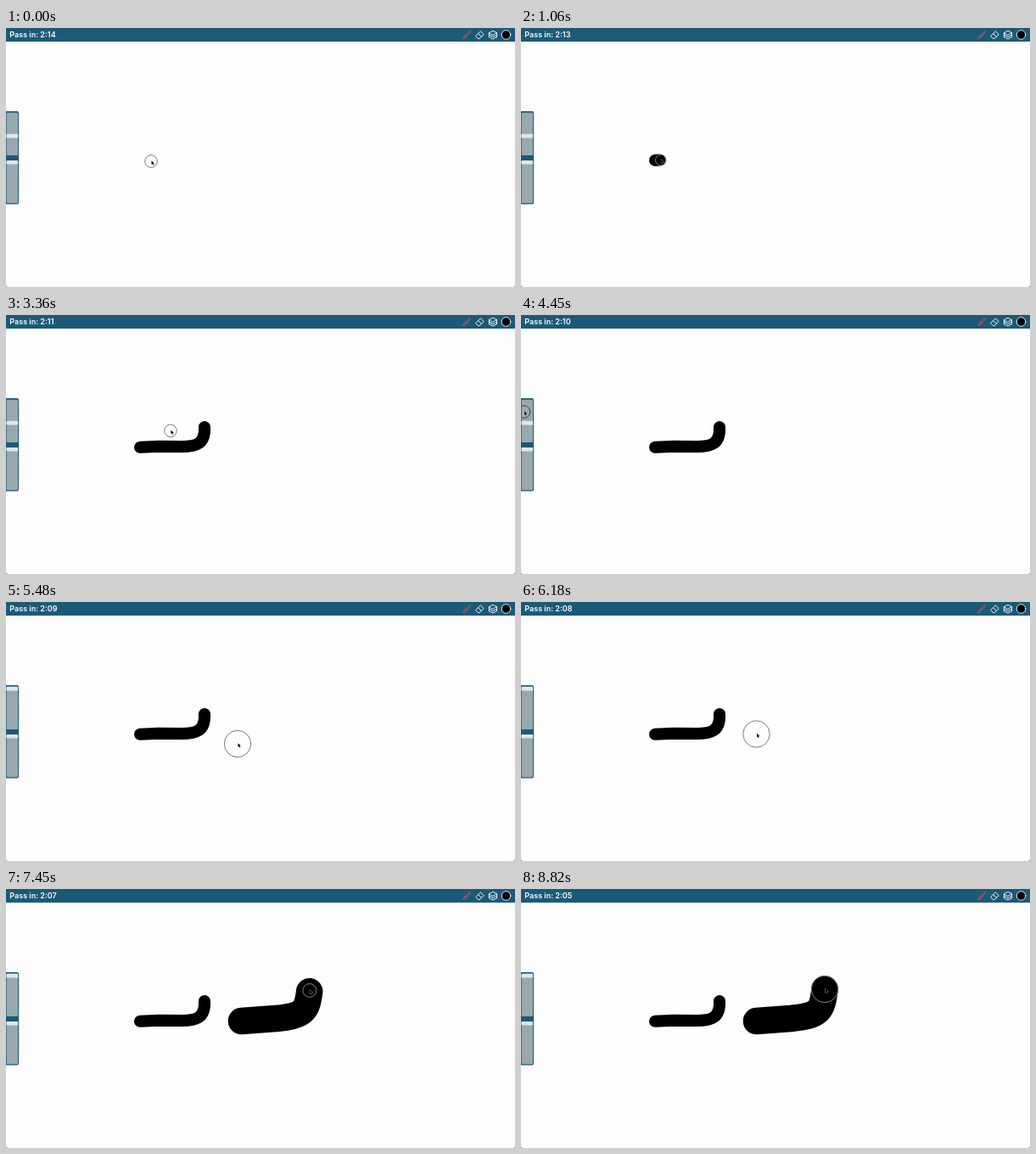
An HTML page for the animation above (8910 ms loop, 600 by 305 pixels).

```html
<!DOCTYPE html>
<html lang="en">
<head>
<meta charset="utf-8">
<title>Drawing board</title>
<style>
  html, body { margin: 0; width: 100%; height: 100%; overflow: hidden; background: #fdfdfd; }
  svg { display: block; width: 600px; height: 305px; }
  text { font: 600 9px Inter, Roboto, sans-serif; fill: #fff; }
  .ink { fill: none; stroke: #000; stroke-linecap: round; stroke-linejoin: round; }
  .icon { fill: none; stroke: #fff; stroke-width: .9; stroke-linejoin: round; stroke-linecap: round; }
  #ring { fill: none; stroke: #bbb; stroke-width: .7; mix-blend-mode: difference; }
</style>
</head>
<body>
<svg viewBox="0 0 600 305">
  <rect width="600" height="305" fill="#444"/>
  <rect y="-5" width="600" height="310" rx="2" fill="#fdfdfd"/>
  <g id="inks"></g>

  <rect width="600" height="16" fill="#1c5978"/>
  <text id="clock" x="4.3" y="11.4"></text>
  <g class="icon">
    <path stroke="#d9545c" d="M541.8 8.4 546.6 3.7Q547.7 3.6 547.4 4.8L543.2 9.8ZM541.6 8.8Q539.6 9 539.6 10.6L538.6 12.2Q541.6 12.8 542.8 10.2"/>
    <path d="M554 9.2 559.3 3.9 563.2 7.6 558.2 12.5H556.6L554 10.1ZM556.6 6.7 560.5 10.3"/>
    <path d="M569.4 5.7 574 3.3 578.6 5.7 574 8.1ZM569.4 8.2 574 10.6 578.6 8.2M569.4 10.6 574 13 578.6 10.6M569.4 5.7V10.6M578.6 5.7V10.6"/>
    <circle cx="589.5" cy="8" r="5.3" fill="#000"/>
  </g>

  <path d="M0 98H13Q15 98 15 100V205.5Q15 207.5 13 207.5H0Z" fill="#1c5978"/>
  <g fill="#97a8af">
    <rect x=".7" y="99.7" width="13.3" height="50.3" rx="1"/>
    <rect x=".7" y="156" width="13.3" height="50.3" rx="1"/>
  </g>
  <g fill="#dfe7eb">
    <rect id="thumb" x=".5" width="13.6" height="4.8" rx="1"/>
    <rect x=".5" y="156" width="13.6" height="4.6" rx="1"/>
  </g>

  <circle id="ring"/>
  <path id="arrow" d="M0 0V4.6L1.1 3.7 1.9 5.4 2.7 5 2 3.4H3.4Z" fill="#000" stroke="#fff" stroke-width=".5" paint-order="stroke"/>
</svg>
<script>
const LOOP = 8910, LAG = 20;
const $ = id => document.getElementById(id);

// Pointer moves in order; those with a width leave ink
const moves = [
  { from: 390, to: 790, d: "M171 157L158 155.8" },
  { from: 970, to: 2640, d: "M158 155.8L180 154.8 207 155C224 155 235 152 234 132", width: 14 },
  { from: 2970, to: 4450, d: "M234 132Q100 150 3.5 114" },
  { from: 4450, to: 4620, d: "M3.5 114L6 127" },
  { from: 4700, to: 4980, d: "M6 127V102", drag: true },
  { from: 5080, to: 5480, d: "M6 102Q150 160 273 167" },
  { from: 5480, to: 6000, d: "M273 167L277.5 155.5" },
  { from: 6280, to: 7480, d: "M277.5 155.5L318 152.5C352 149 355 144 358 118", width: 31.5 }
];
const inks = moves.filter(m => m.width);
const drag = moves.find(m => m.drag);

const ramp = (t, from, to) => Math.min(1, Math.max(0, (t - from) / (to - from)));
const smooth = s => s * s * (3 - 2 * s);
const glide = s => s + .4 * s * (1 - s);
const mix = (a, b, s) => a + (b - a) * s;
const progress = (m, t) => (m.width ? glide : smooth)(ramp(t, m.from, m.to));

function set(el, attrs) {
  for (const name in attrs) el.setAttribute(name, attrs[name]);
}

for (const m of moves) {
  m.path = document.createElementNS("http://www.w3.org/2000/svg", "path");
  m.path.setAttribute("d", m.d);
  m.length = m.path.getTotalLength();
}
for (const m of inks) {
  set(m.path, { class: "ink", "stroke-width": m.width });
  $("inks").append(m.path);
}

function draw(t) {
  const move = moves.filter(m => m.from <= t).pop() || moves[0];
  const { x, y } = move.path.getPointAtLength(move.length * progress(move, t));

  for (const m of inks) {
    const done = m.length * progress(m, t - LAG);
    set(m.path, {
      visibility: done > 0 ? "visible" : "hidden",
      "stroke-dasharray": `${done} ${m.length * 2}`
    });
  }

  // The ring follows the brush size and narrows while pressed
  const size = progress(drag, t);
  const press = Math.max(...inks.map(m =>
    ramp(t, m.from - 60, m.from + 60) * (1 - ramp(t, m.to - 100, m.to + 300))));
  set($("ring"), { cx: x, cy: y, r: mix(mix(7.3, 15.7, size), 6.3, press) });
  set($("arrow"), { transform: `translate(${x + .5} ${y - .8})` });
  set($("thumb"), { y: mix(124.8, 99.8, size) });

  const left = 13 - Math.floor((t - 780) / 1005);
  $("clock").textContent = "Pass in: 2:" + String(left).padStart(2, "0");
}

const start = performance.now();
function tick() {
  draw((performance.now() - start) % LOOP);
  requestAnimationFrame(tick);
}
tick();
</script>
</body>
</html>
```
